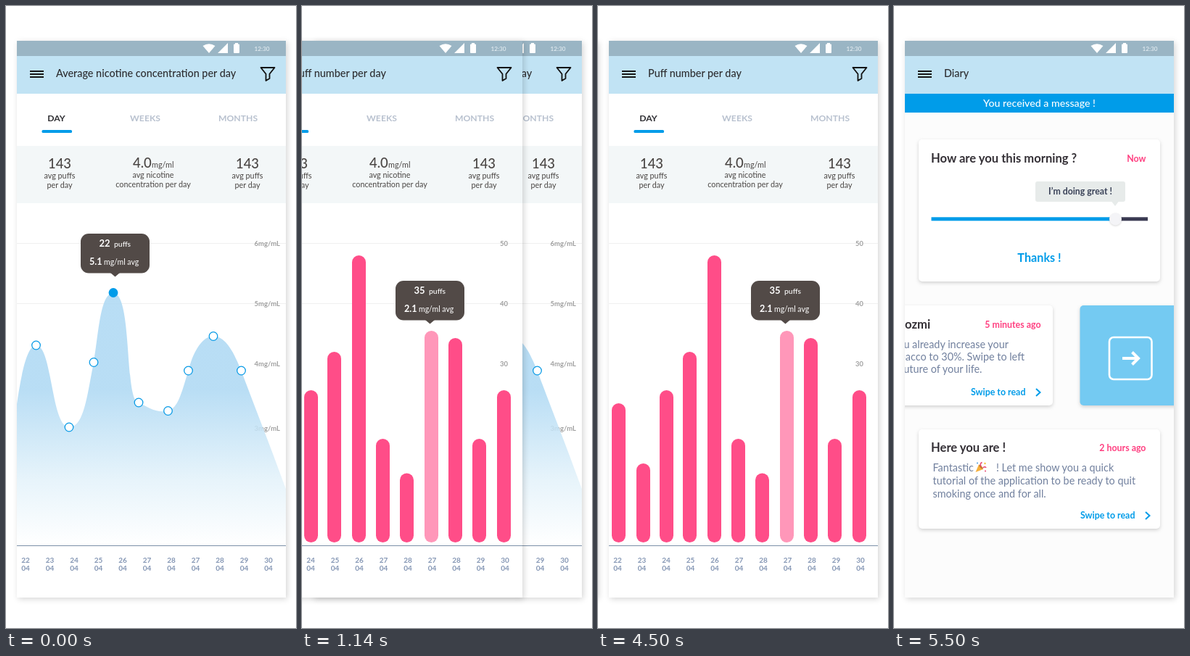
Recreate the animation shown at these times as an HTML page. Size 400 px wide and 858 px high, loop 8 s.

```html
<!DOCTYPE html>
<html lang="en">
<head>
<meta charset="utf-8">
<style>
  html, body { margin: 0; width: 100%; height: 100%; overflow: hidden; background: #fff; }
  .screen {
    position: absolute; left: 15px; top: 48px; width: 371px; height: 768px;
    overflow: hidden; background: #fff; box-shadow: 2px 2px 8px rgba(0, 0, 0, .17);
  }
  svg { display: block; font-family: Lato, sans-serif; }
  .card { fill: #fff; filter: drop-shadow(0 2px 2.5px rgba(0, 0, 0, .17)); }
</style>
</head>
<body>
<script>
const BLUE = '#009ce9', PINK = '#ff4d88', INK = '#4a4644', GREY = '#a0a0a0', SLATE = '#71809e';

const text = (x, y, str, size, fill, weight = 400, anchor = 'start') =>
  `<text x="${x}" y="${y}" font-size="${size}" fill="${fill}" font-weight="${weight}" text-anchor="${anchor}">${str}</text>`;
const centered = (x, y, str, size, fill, weight) => text(x, y, str, size, fill, weight, 'middle');
const rect = (x, y, w, h, fill, r = 0, extra = '') =>
  `<rect x="${x}" y="${y}" width="${w}" height="${h}" rx="${r}" fill="${fill}" ${extra}/>`;
const path = (d, fill, extra = '') => `<path d="${d}" fill="${fill}" ${extra}/>`;
const stroke = (color, width) => `stroke="${color}" stroke-width="${width}"`;
const circle = (x, y, r, fill, extra = '') => `<circle cx="${x}" cy="${y}" r="${r}" fill="${fill}" ${extra}/>`;

function header(title) {
  return rect(15, 48, 371, 21, '#9ab5c4') + rect(15, 69, 371, 52, '#c1e3f4') +
    path('M271.5 55Q280 49.5 288.5 55L280 65Z M306 51V65H292Z', '#fff') +
    rect(314, 52.5, 8, 12.5, '#fff', 1) + rect(316, 51, 4, 2, '#fff') +
    text(342.5, 62.3, '12:30', 8.2, '#eef4f7') +
    path('M33 90H52M33 94H52M33 98H52', 'none', stroke('#151515', 2.1)) +
    text(69, 98, title, 14.4, '#2d2d30', 500);
}

function stat(x) {
  return centered(x, 224, '143', 18.4, INK, 500) +
    centered(x, 238, 'avg puffs', 10.8, INK) + centered(x, 251, 'per day', 10.8, INK);
}

function tooltip(x, y, puffs, dose) {
  return rect(x, y, 95, 54.5, '#524a47', 11) +
    path(`M${x + 41} ${y + 54}h13l-6.5 5.5z`, '#524a47') +
    text(x + 25.5, y + 18, puffs, 13, '#fff', 700) + text(x + 46, y + 18, 'puffs', 10.4, '#fff', 500) +
    text(x + 12, y + 43, dose, 12.6, '#fff', 700) + text(x + 32, y + 43, 'mg/ml avg', 10.5, '#fff');
}

function dashboard(title, axisLabels, chart) {
  const days = [22, 23, 24, 25, 26, 27, 28, 27, 28, 29, 30];
  return header(title) +
    path('M351.5 85H370.5L363.5 93.8V100L358.5 103V93.8Z', 'none', stroke('#111', 1.8) + ' stroke-linejoin="round"') +
    centered(69.5, 159, 'DAY', 12.2, '#2f2f33', 700) +
    centered(192, 159, 'WEEKS', 12.2, '#b8c1cf', 700) +
    centered(320, 159, 'MONTHS', 12.2, '#b8c1cf', 700) +
    rect(49.5, 171, 41.5, 4, BLUE, 1.5) +
    rect(15, 193, 371, 79, '#f3f7f8') + stat(74) + stat(333) +
    text(175, 223, '4.0', 18.5, INK, 500) + text(201, 223, 'mg/ml', 10.8, INK) +
    centered(203, 236.5, 'avg nicotine', 10.8, INK) +
    centered(203, 250, 'concentration per day', 10.8, INK) +
    path('M15 327.5H386M15 410.5H386', 'none', stroke('#f0f0f0', 1)) +
    axisLabels + chart +
    path('M15 744.5H386', 'none', stroke('#7b90a8', 1)) +
    days.map((day, i) => centered(27 + 33.5 * i, 768, day, 10, '#8496b4', 700) +
      centered(27 + 33.5 * i, 779, '04', 10, '#8496b4', 700)).join('');
}

function nicotineScreen() {
  const points = [[41.5, 468], [87, 581], [121, 491.5], [183, 547], [223.5, 558.5], [251.5, 503], [286, 455.5], [324.5, 503]];
  const labels = [331, 414, 497, 586].map((y, i) => text(378, y, `${6 - i}mg/mL`, 9.5, GREY, 700, 'end')).join('');
  const area = `<defs><linearGradient id="fade" gradientUnits="userSpaceOnUse" x1="0" y1="396" x2="0" y2="744">
    <stop offset=".38" stop-color="#add8f3"/><stop offset=".74" stop-color="#e3f2fa"/>
    <stop offset="1" stop-color="#fff"/></linearGradient></defs>` +
    path(`M15 549C20 515 28 468 41.5 468C64 468 62 581 87 581C108 581 112 535 121 491.5
      C128 450 130 396 148 396C175 396 163 547 183 547C195 553 207 562 223.5 558.5
      C238 555 243 530 251.5 503C258 478 270 455.5 286 455.5C304 455.5 315 480 324.5 503
      C340 545 362 600 386 666V744H15Z`, 'url(#fade)', 'opacity=".86"');
  const dots = points.map(([x, y]) => circle(x, y, 5.8, '#fff', stroke('#0a9be6', 1.3))).join('');
  return dashboard('Average nicotine concentration per day', labels,
    area + dots + circle(148, 395.5, 6.4, BLUE) + tooltip(103, 314, 22, '5.1'));
}

function puffScreen() {
  const lefts = [19, 53, 85, 117, 151, 184, 217, 251, 284, 317, 351];
  const tops = [548, 631, 530, 477, 344, 597, 644.5, 448, 458, 597, 530];
  const labels = [331, 414, 497].map((y, i) => text(366, y, 50 - 10 * i, 9.5, GREY, 700, 'end')).join('');
  const bars = lefts.map((x, i) => rect(x, tops[i], 19, 740 - tops[i], i === 7 ? '#ff97b9' : PINK, 9.5)).join('');
  return dashboard('Puff number per day', labels, bars + tooltip(211, 379, 35, '2.1'));
}

function diaryScreen() {
  const card = (x, y, w, h) => rect(x, y, w, h, '#fff', 5, 'class="card"');
  const heading = (x, y, str) => text(x, y, str, 16.6, '#343036', 700);
  const when = (x, y, str) => text(x, y, str, 12.4, '#ff3f80', 700, 'end');
  const readLink = (x, y) => text(x, y, 'Swipe to read', 12.4, BLUE, 700) +
    path(`M${x + 90} ${y - 9}l5.5 5l-5.5 5`, 'none', stroke(BLUE, 2));
  const popper = path('M112.5 643L117 632.5L123 639Z', '#f6b03c') +
    path('M117 632.5Q122 634 123 639Q118 638 117 632.5Z', '#c9782c') +
    path('M120 635Q118 631 121.5 629.5M122.5 637Q126 634.5 127 637', 'none', stroke('#e8446f', 1.5)) +
    circle(115, 630.5, 1, '#4a9de0') + circle(125.5, 631, 1.2, '#f3c33f') + circle(126, 641.5, 1, '#e8446f');

  return rect(15, 48, 371, 768, '#fcfcfc') + header('Diary') +
    rect(15, 121, 371, 26, BLUE) + centered(200.5, 139, 'You received a message !', 14.2, '#fff', 500) +

    card(34, 184, 333, 196) + heading(51, 216, 'How are you this morning ?') + when(347.5, 215, 'Now') +
    rect(195, 242, 124, 28, '#e7ebea', 3) + path('M300 269.5H310L305 276Z', '#e7ebea') +
    centered(257, 260, 'I’m doing great !', 12.3, '#3a4258', 700) +
    rect(51.5, 291.3, 254, 5, BLUE) + rect(305, 291.3, 45, 5, '#3a3a52') +
    circle(305.5, 294, 8.5, '#f4f4f7', 'style="filter:drop-shadow(0 1px 1px rgba(0,0,0,.15))"') +
    centered(200.5, 353, 'Thanks !', 16.2, BLUE, 700) +

    card(-100, 413, 319, 138) + heading(15, 445, 'ozmi') + when(202.5, 444, '5 minutes ago') +
    text(158, 471.5, 'you already increase your', 14.4, SLATE, 400, 'end') +
    text(180, 488.5, 'tobacco to 30%. Swipe to left', 14.4, SLATE, 400, 'end') +
    text(121.5, 505.5, 'future of your life.', 14.4, SLATE, 400, 'end') + readLink(106, 537) +

    rect(256.5, 413, 150, 138, '#74caf2', 5, 'style="filter:drop-shadow(0 2px 2.5px rgba(0,0,0,.17))"') +
    rect(297, 457, 58.5, 58, 'none', 6, stroke('#fff', 2.6)) +
    path('M315 486H336M328.5 477.5L337 486L328.5 494.5', 'none', stroke('#fff', 4)) +

    card(34, 584, 333, 137) + heading(51, 615, 'Here you are !') + when(347.5, 614, '2 hours ago') +
    text(53.5, 642, 'Fantastic', 14.4, SLATE) + popper + text(141, 642, '! Let me show you a quick', 14.4, SLATE) +
    text(53.5, 660, 'tutorial of the application to be ready to quit', 14.4, SLATE) +
    text(53.5, 678, 'smoking once and for all.', 14.4, SLATE) + readLink(257, 707);
}

const screens = [nicotineScreen(), puffScreen(), diaryScreen()].map(content => {
  const el = document.createElement('div');
  el.className = 'screen';
  el.innerHTML = `<svg width="371" height="768" viewBox="15 48 371 768">${content}</svg>`;
  return document.body.appendChild(el);
});

const LOOP = 8000, SLIDE = 1000, STEP = 40;
const slideStarts = [-SLIDE, 500, 4500];

// Decelerating slide, advanced in 40 ms steps: distance left to travel.
function distanceLeft(elapsed) {
  const rest = 1 - Math.min(SLIDE, Math.floor(elapsed / STEP) * STEP) / SLIDE;
  return Math.round(rest * rest * (820 - 570 * rest + 137 * rest * rest));
}

function draw(now) {
  const time = now % LOOP;
  screens.forEach((el, i) => {
    const covered = i < 2 && time >= slideStarts[i + 1] + SLIDE;
    const visible = time >= slideStarts[i] && !covered;
    el.style.visibility = visible ? 'visible' : 'hidden';
    if (visible) el.style.transform = `translateX(${-distanceLeft(time - slideStarts[i])}px)`;
  });
  requestAnimationFrame(draw);
}
draw(performance.now());
</script>
</body>
</html>
```
